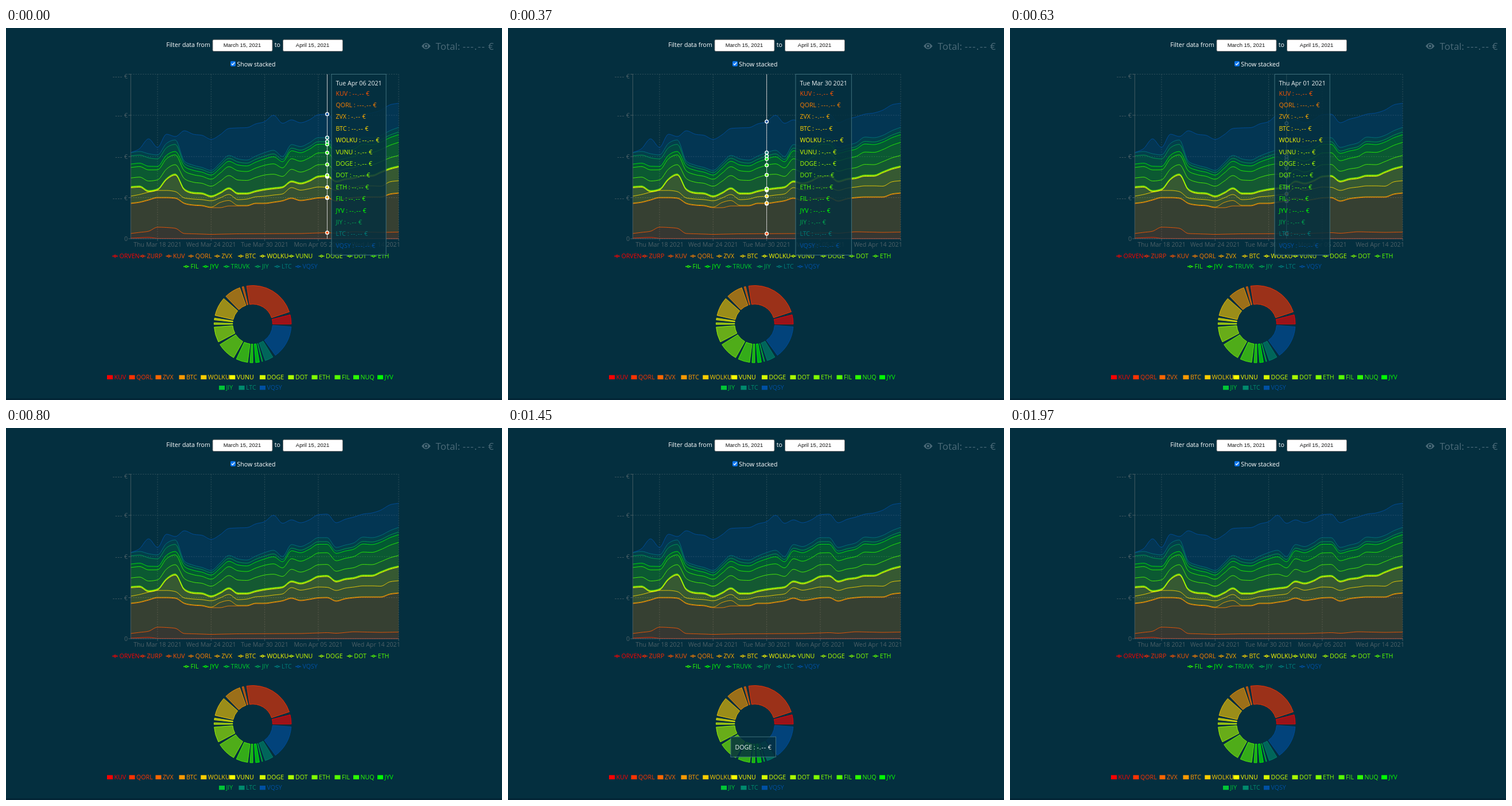
An HTML page for the animation above (2130 ms loop, 864 px wide and 648 px high).

```html
<!DOCTYPE html>
<html lang="en">
<head>
<meta charset="utf-8">
<title>Portfolio chart</title>
<style>
  html, body { margin: 0; width: 100%; height: 100%; overflow: hidden; background: #042f3f; }
  svg { display: block; width: 864px; height: 648px; }
  text { font: 10.65px "Open Sans", "Noto Sans", sans-serif; white-space: pre; }
  .dash { letter-spacing: .08em; }
  .field { font: 9.46px "Liberation Sans", Arial, sans-serif; }
  .total { font-size: 16.9px; }
</style>
</head>
<body>
<svg id="stage" viewBox="0 0 864 648"></svg>
<script>
const LOOP = 2130, BG = '#042f3f';
const LEFT = 217.3, RIGHT = 684, TOP = 80.5, BASE = 367, DAYS = 30;
const dayX = d => LEFT + (RIGHT - LEFT) * d / DAYS;

const lineNames = ['ORVEN', 'ZURP', 'KUV', 'QORL', 'ZVX', 'BTC', 'WOLKU', 'VUNU', 'DOGE', 'DOT',
  'ETH', 'FIL', 'JYV', 'TRUVK', 'JIY', 'LTC', 'VQSY'];
const pieNames = ['KUV', 'QORL', 'ZVX', 'BTC', 'WOLKU', 'VUNU', 'DOGE', 'DOT', 'ETH', 'FIL',
  'NUQ', 'JYV', 'JIY', 'LTC', 'VQSY'];
const amounts = { QORL: '---.--', VQSY: '---.--', ZVX: '-.--', VUNU: '-.--', DOGE: '-.--', JIY: '-.--' };
const label = name => `${name} : ${amounts[name] || '--.--'} €`;

// Red to yellow to lime to blue, with the middle stops at given indexes.
function ramp(yellow, lime, last) {
  const stops = [[0, 255, 0, 0], [yellow, 255, 255, 0], [lime, 0, 255, 0], [last, 0, 80, 163]];
  return i => {
    const k = stops.findIndex((s, n) => n && i <= s[0]);
    const a = stops[k - 1], b = stops[k], u = (i - a[0]) / (b[0] - a[0]);
    return `rgb(${[1, 2, 3].map(c => Math.round(a[c] + (b[c] - a[c]) * u))})`;
  };
}
const lineColor = ramp(6, 12, 16), pieColor = ramp(5, 11, 14);

function text(x, y, str, fill, extra = '') {
  const body = str.replace(/-[-.]*/g, m => `<tspan class="dash">${m}</tspan>`);
  return `<text x="${x}" y="${y}" fill="${fill}" ${extra}>${body}</text>`;
}
const rect = (x, y, w, h, extra) => `<rect x="${x}" y="${y}" width="${w}" height="${h}" ${extra}/>`;
const path = (d, extra) => `<path d="${d}" ${extra}/>`;

// Linear interpolation in rows of [key, ...values].
function lerpRows(rows, t) {
  const k = rows.findIndex(r => r[0] >= t);
  if (k < 0) return rows[rows.length - 1].slice(1);
  if (k === 0) return rows[0].slice(1);
  const a = rows[k - 1], b = rows[k], u = (t - a[0]) / (b[0] - a[0]);
  return a.slice(1).map((v, i) => v + (b[i + 1] - v) * u);
}

// ---- stacked layers: height on screen of each layer's upper edge ----
const blueTop = [217, 210, 193, 208, 185, 189, 179, 185, 187, 194, 186, 175, 174, 173.5, 167, 163,
  152, 166, 160, 165, 160, 151, 150, 165, 159, 155, 150, 148, 143, 134, 131];
const tealTop = [217, 215, 219, 221, 201, 195, 232, 239, 243, 248, 235, 222, 228, 230, 223, 217,
  213, 224, 203, 206.5, 200, 191, 191, 208, 204, 200, 190, 191, 187, 179, 173];
const limeTop = [276, 275, 283, 280, 262, 254, 280, 286, 287, 292, 286, 278, 287, 287, 283, 280,
  278, 276, 266, 269.5, 265, 257.5, 256.5, 266, 262, 260, 256, 256, 250, 244, 240];
const goldTop = [293, 290, 286, 283, 283, 285, 296, 298, 299, 301, 296, 290, 299, 298, 294, 293,
  291, 289, 278, 282.5, 280, 277, 277.5, 283, 279, 277, 275, 275, 275.5, 268, 266];
const amberTop = [306, 304, 300, 296, 296, 297, 306, 309, 310, 313, 313, 310, 310, 310, 306, 306,
  304, 301.5, 297, 301, 299, 296.5, 296, 302, 298, 296, 295, 295, 295, 290, 288];
const orangeTop = [[0, 358], [2, 354], [3, 347], [4, 347.5], [5, 349], [6, 358], [9, 359.5],
  [12, 358.5], [19, 358], [22, 356.5], [23, 357.5], [25, 355], [28, 356], [30, 355.5]];
const redTop = [[0, 366], [2, 364.7], [3, 366.4], [6, 367], [30, 367]];
// Shares of the green band for four inner edges.
const shares = [[0, .1, .34, .44, .75], [5, .13, .34, .44, .73], [6, .08, .19, .35, .63],
  [15, .095, .175, .35, .62], [19, .1, .17, .405, .706], [30, .12, .19, .39, .73]];

const daily = f => Array.from({ length: DAYS + 1 }, (_, d) => f(d));
const green = k => daily(d => tealTop[d] + (limeTop[d] - tealTop[d]) * lerpRows(shares, d)[k]);
const below = gap => limeTop.map(y => y + gap);
const layers = [
  [1, daily(d => lerpRows(redTop, d)[0])],
  [2, daily(d => lerpRows(orangeTop, d)[0])],
  [3, amberTop],
  [4, amberTop.map((y, d) => y - (d === 10 ? 9 : d === 11 ? 9.5 : 1))],
  [5, goldTop],
  [6, below(2.4)], [7, below(1.5)], [8, below(.8)], [9, limeTop],
  [10, green(3)], [11, green(2)], [12, green(1)], [14, green(0)],
  [15, tealTop], [16, blueTop]
];

// Monotone cubic through the daily values.
function curve(ys) {
  const s = ys.slice(1).map((y, i) => y - ys[i]);
  const m = ys.map((_, i) => {
    if (!i) return s[0];
    if (i === DAYS) return s[DAYS - 1];
    const a = s[i - 1], b = s[i];
    return (Math.sign(a) + Math.sign(b)) * Math.min(Math.abs(a), Math.abs(b), Math.abs(a + b) / 4);
  });
  const pts = [];
  for (let n = 0; n <= DAYS * 6; n++) {
    const i = Math.min(DAYS - 1, Math.floor(n / 6)), u = n / 6 - i, v = 1 - u;
    const y = ys[i] * (1 + 2 * u) * v * v + ys[i + 1] * u * u * (3 - 2 * u)
      + m[i] * u * v * v - m[i + 1] * u * u * v;
    pts.push(`${dayX(n / 6).toFixed(1)},${y.toFixed(2)}`);
  }
  return pts;
}

// ---- still parts ----
function header() {
  const field = (x, str) => rect(x, 20.3, 104, 20.2, 'rx="2" fill="#fff" stroke="#6d6d6d"')
    + text(x + 51.5, 33.4, str, '#111', 'class="field" text-anchor="middle"');
  return text(279.2, 33.2, 'Filter data from', '#fff') + field(360, 'March 15, 2021')
    + text(467.8, 33.2, 'to', '#fff') + field(482.5, 'April 15, 2021')
    + rect(391, 57.7, 9, 9, 'rx="1.6" fill="#0b76ef"')
    + path('M393 62.3l1.8 1.9 3.4-4.2', 'fill="none" stroke="#fff" stroke-width="1.3"')
    + text(402.3, 66.8, 'Show stacked', '#fff')
    + path('M724 31.5Q731.7 21 739.5 31.5Q731.7 42 724 31.5Z', 'fill="#4b6a78"')
    + `<circle cx="731.7" cy="31.5" r="2.9" fill="#4b6a78" stroke="${BG}" stroke-width="1.5"/>`
    + text(748.6, 37.5, 'Total: ---.-- €', '#4b6a78', 'class="total"');
}

const day = d => new Date(2021, 2, 15 + d).toDateString();

function axes() {
  const gridY = [80.5, 152, 224, 295.5, BASE], gridX = [3, 9, 15, 21, 30];
  const centers = [264, 357.3, 450.5, 544, 644.5];
  const names = ['---- €', '--- €', '--- €', '---- €', '0'];
  const grid = gridY.map(y => `M${LEFT} ${y}H${RIGHT}`).join('')
    + gridX.map(d => `M${dayX(d)} ${TOP}V${BASE}`).join('');
  const axis = `M${LEFT} ${TOP}V${BASE}H${RIGHT}` + gridY.map(y => `M${LEFT - 4} ${y}h4`).join('')
    + gridX.map(d => `M${dayX(d)} ${BASE}v4`).join('');
  return path(grid, 'fill="none" stroke="#3a5962" stroke-width=".8" stroke-dasharray="2.1"')
    + layers.map(([i, ys], n) => {
      const top = curve(ys);
      const floor = n ? curve(layers[n - 1][1]).reverse() : [`${RIGHT},${BASE}`, `${LEFT},${BASE}`];
      const c = lineColor(i);
      return path(`M${top.concat(floor).join('L')}Z`, `fill="${c}" fill-opacity=".2"`)
        + path(`M${top.join('L')}`, `fill="none" stroke="${c}" stroke-width=".85"`);
    }).join('')
    + path(axis, 'fill="none" stroke="#56676c" stroke-width=".8"')
    + names.map((s, i) => text(212, i ? gridY[i] + 4 : 88, s, '#4c6067', 'text-anchor="end"')).join('')
    + gridX.map((d, i) => text(centers[i], 381, day(d), '#4c6067', 'text-anchor="middle"')).join('');
}

function legends() {
  const lineX = [185, 233, 278.5, 317.3, 363, 404, 442, 492, 544.5, 593.7, 635.3,
    309, 342.7, 379, 433.5, 467.5, 504];
  const pieX = [176, 214.5, 260.5, 301.5, 339.3, 389.3, 442, 491.5, 532.5, 572.5, 605, 647,
    371, 405.5, 442];
  return lineNames.map((s, i) => {
    const x = lineX[i], y = i < 11 ? 397.3 : 415.5, c = lineColor(i);
    return path(`M${x} ${y}h3.3a1.7 1.7 0 0 1 3.4 0h3.3m-3.3 0a1.7 1.7 0 0 1 -3.4 0`,
      `fill="none" stroke="${c}" stroke-width="1.3"`) + text(x + 12.5, y + 3.6, s, c);
  }).join('') + pieNames.map((s, i) => {
    const x = pieX[i], y = i < 12 ? 604.7 : 623, c = pieColor(i);
    return rect(x, y, 10, 7.3, `fill="${c}"`) + text(x + 12.5, y + 7.2, s, c);
  }).join('');
}

function pie() {
  const ends = [[0, 14], [18.5, 99], [103.5, 106], [109.5, 134], [138.5, 167], [171, 173.7],
    [178, 180.5], [184.5, 207.5], [212, 240.5], [245, 262.5], [266, 270.3], [274.5, 280],
    [284, 285], [289, 301.5], [306, 356]];
  const at = (r, a) => {
    const q = a * Math.PI / 180;
    return `${(429.7 + r * Math.cos(q)).toFixed(2)} ${(515.8 - r * Math.sin(q)).toFixed(2)}`;
  };
  const R = 67.3, r = 34.8;
  return ends.map(([a, b], i) => path(
    `M${at(R, a)}A${R} ${R} 0 0 0 ${at(R, b)}L${at(r, b)}A${r} ${r} 0 0 1 ${at(r, a)}Z`,
    `fill="${pieColor(i)}" fill-opacity=".6" stroke="${pieColor(i)}" stroke-width=".8"`)).join('');
}

// ---- motion ----
const cursorSteps = [[0, 22], [50, 21], [110, 20], [150, 19], [210, 18], [250, 17], [290, 16],
  [350, 15], [430, 14], [510, 15], [570, 16], [610, 17], [710, null]];
const tipPath = [[0, 567], [50, 567], [110, 565], [170, 556], [250, 538], [310, 520], [370, 501],
  [430, 480], [490, 463], [550, 456], [590, 456], [630, 461], [710, 471]];
const pieSteps = [[0, null], [1070, 'KUV'], [1190, 'VQSY'], [1270, 'LTC'], [1310, 'JIY'], [1350, 'FIL'],
  [1390, 'ETH'], [1430, 'DOT'], [1450, 'DOGE'], [1490, 'VUNU'], [1530, 'WOLKU'], [1570, 'BTC'],
  [1590, null], [1690, 'KUV'], [1970, null]];
const pieRoute = [[1070, 459, 474], [1110, 464, 481], [1150, 474, 496], [1190, 484, 513],
  [1230, 487, 530], [1270, 480, 552], [1310, 462, 568], [1350, 440, 574], [1390, 415, 565],
  [1430, 396, 548], [1450, 388, 538], [1530, 387, 510], [1590, 389, 485],
  [1690, 391, 473], [1770, 405, 479], [1870, 436, 492], [1970, 459, 501.5]];
const held = (steps, t) => steps.filter(s => s[0] <= t).pop()[1];

const tipBox = (x, y, h) =>
  rect(x, y, 10, h, `class="box" fill="${BG}" fill-opacity=".83" stroke="#467884" stroke-width=".9"`);

function chartTip(t) {
  const d = held(cursorSteps, t);
  if (d === null) return '';
  const x = dayX(d), tx = lerpRows(tipPath, t)[0];
  const shown = layers.slice(1);
  return path(`M${x} ${TOP}V${BASE}`, 'stroke="#ccc" stroke-width="1"')
    + shown.map(([i, ys]) => `<circle cx="${x}" cy="${ys[d]}" r="2.8" fill="${lineColor(i)}" stroke="#fff" stroke-width="1.4"/>`).join('')
    + tipBox(tx, 80.5, 315) + text(tx + 7.4, 100, day(d), '#f0f4f4', 'class="wide"')
    + shown.map(([i], n) => text(tx + 7.4, 117.6 + 20.4 * n, label(lineNames[i]), lineColor(i))).join('');
}

function pieTip(t) {
  const name = held(pieSteps, t);
  if (!name) return '';
  const [x, y] = lerpRows(pieRoute, t);
  return tipBox(x, y, 35) + text(x + 7.4, y + 21.8, label(name), '#f0f4f4', 'class="wide"');
}

const stage = document.getElementById('stage');
stage.innerHTML = rect(0, 0, 864, 648, `fill="${BG}"`) + rect(0, 645, 864, 3, 'fill="#032536"')
  + header() + axes() + legends() + pie() + '<g id="tip"></g>';
const tip = document.getElementById('tip');

let last = -1;
const start = performance.now();
function draw(now) {
  const ms = Math.max(0, now - start) % LOOP;
  const t = ms < 50 ? 0 : 50 + Math.floor((ms - 50) / 20) * 20;
  if (t !== last) {
    last = t;
    tip.innerHTML = chartTip(t) + pieTip(t);
    const box = tip.querySelector('.box');
    if (box) box.setAttribute('width', tip.querySelector('.wide').getComputedTextLength() + 14.8);
  }
  requestAnimationFrame(draw);
}
draw(start);
</script>
</body>
</html>
```
